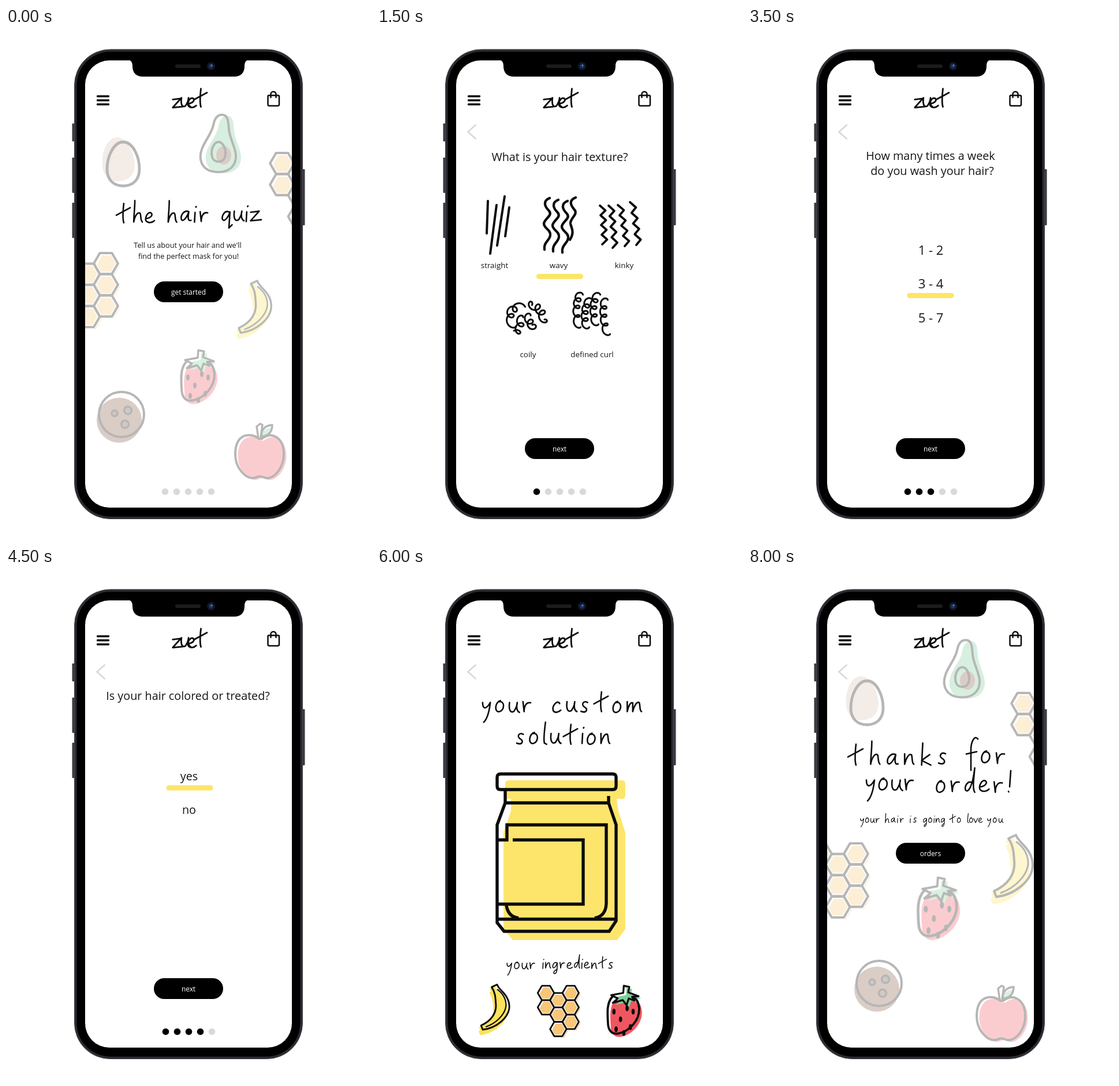
An HTML page that plays this animation: 632 px wide and 885 px high, repeating every 9 s.

```html
<!DOCTYPE html>
<html lang="en">
<head>
<meta charset="utf-8">
<title>Hair quiz</title>
<style>
html,body{margin:0;width:100%;height:100%;overflow:hidden;background:#fff}
svg{display:block;width:100vw;height:100vh}
text{font-family:"Open Sans","Noto Sans",sans-serif;text-anchor:middle;fill:#161616}
.ln{fill:none;stroke:#0c0c0c;stroke-linecap:round;stroke-linejoin:round}
</style>
</head>
<body>
<svg id="stage" viewBox="0 0 632 885" xmlns="http://www.w3.org/2000/svg"></svg>
<script>
const LOOP = 9000;
let css = '', count = 0;

// Show content only from a to b (ms) of the loop.
function during(a, b, content) {
  const id = 'w' + count++;
  const key = (t, v) => `${t / LOOP * 100}%{visibility:${v}}`;
  css += `@keyframes ${id}{${key(0, a ? 'hidden' : 'visible')}${key(a, 'visible')}${key(b, 'hidden')}}`
       + `.${id}{animation:${id} ${LOOP}ms step-end infinite}`;
  return `<g class="${id}">${content}</g>`;
}

const line = (d, w = 4, more = '') => `<path class="ln" d="${d}" stroke-width="${w}" ${more}/>`;
const shape = (d, fill, more = '') => `<path d="${d}" fill="${fill}" ${more}/>`;
const move = (x, y, s = 1) => `transform="translate(${x} ${y}) scale(${s})"`;
const text = (s, x, y, size = 19.8, fill = '#161616') =>
  `<text x="${x}" y="${y}" font-size="${size}" style="fill:${fill}">${s}</text>`;
const label = (s, x, y) => text(s, x, y, 13.4);
const use = (id, x = 0, y = 0, s = 1) => `<use href="#${id}" ${move(x, y, s)}/>`;
const pill = (s, y) => `<rect x="256" y="${y}" width="120" height="36" rx="18"/>` + text(s, 316, y + 22.5, 11.9, '#fff');
const mark = (x, y) => `<rect x="${x}" y="${y}" width="81" height="9" rx="4.5" fill="#fde567"/>`;
const dots = (n, x = 276.5) => [0, 1, 2, 3, 4].map(i =>
  `<circle cx="${x + i * 20}" cy="801.5" r="5.8" fill="${i < n ? '#000' : '#d9d9d9'}"/>`).join('');

// Handwriting: pen strokes on a 10 unit x-height, baseline at 0.
const pen = {
  a: 'M8-9C4-11 0-6 1-2C2 1 6-3 8-9C7-4 7 0 10-1',
  c: 'M7-8C5-12 0-6 1-2C2 1 6 0 8-2',
  d: 'M7-8C3-11 0-5 1-2C3 1 7-4 9-21C8-10 7-3 9 0',
  e: 'M1-4C5-4 8-7 6-9C3-11 0-5 1-2C3 1 7 0 9-2',
  f: 'M10-21C7-25 4-18 4-12L4 6M0-8L9-10',
  g: 'M7-9C3-11 0-5 1-2C3 1 7-5 8-9C8-2 8 8 4 8C1 8 2 4 8 1',
  h: 'M2-20C2-12 1-6 1 0C2-6 5-10 7-8C8-6 7-2 9 0',
  i: 'M1.5-9L1 0M2.3-14L2.6-14.5',
  k: 'M2-19L1 0M8-9L1-4L9 0',
  l: 'M3-20C2-12 1-5 2-1L4 0',
  m: 'M1-9L1 0C2-5 4-9 6-8L6 0C7-5 10-10 12-8C13-5 12-1 14 0',
  n: 'M1-9L1 0C2-5 5-10 7-8C8-5 7-1 9 0',
  o: 'M5-10C0-9-1 1 4 0C9-1 9-10 4-9',
  q: 'M7-9C3-11 0-5 1-2C3 1 7-5 8-9L7 6L10 3',
  r: 'M1-9L2 0C2-5 4-9 8-8',
  s: 'M7-9C3-11 1-7 4-5C8-3 6 1 1-1',
  t: 'M7-18C6-9 6-3 7 0M0-7L13-14',
  u: 'M1-9C0-2 2 1 5-1C7-4 8-7 8-9C7-4 8-1 10 0',
  v: 'M0-9L4 0L9-10',
  y: 'M1-9C1-3 4-2 8-9C7 0 5 6 2 9',
  z: 'M1-8L9-9L1 0L11-1',
  '!': 'M3-18L2-4M1 0L1.2.4'
};
const wide = { i: 2, l: 4, m: 14, t: 13, z: 11, '!': 3 };

function hand(word, x0, x1, y, s, w = 2.6) {
  const sizes = [...word].map(c => wide[c] || 9);
  const gap = ((x1 - x0) / s - sizes.reduce((a, b) => a + b)) / (word.length - 1);
  let x = 0;
  const strokes = [...word].map((c, i) => {
    const p = line(pen[c], w / s, move(x, i % 2 ? -.4 : .3));
    x += sizes[i] + gap;
    return p;
  }).join('');
  return `<g role="img" aria-label="${word}" ${move(x0, y, s)}>${strokes}</g>`;
}

// Hair strands
function zigzag(x0, y0, x1, y1, n) {
  let d = '';
  for (let i = 0; i <= n; i++) {
    const k = i / n, side = i % 2 ? 5 : -4;
    d += `${i ? 'L' : 'M'}${x0 + (x1 - x0) * k + side} ${y0 + (y1 - y0) * k}`;
  }
  return line(d, 3.8);
}
function curl(x0, y0, cx, cy, x1, y1, turns, r) {
  let d = '';
  for (let i = 0; i <= 80; i++) {
    const k = i / 80, j = 1 - k, a = k * turns * 2 * Math.PI;
    const x = j * j * x0 + 2 * j * k * cx + k * k * x1 + r * Math.cos(a);
    const y = j * j * y0 + 2 * j * k * cy + k * k * y1 - r * Math.sin(a);
    d += `${i ? 'L' : 'M'}${x.toFixed(1)} ${y.toFixed(1)}`;
  }
  return line(d, 3);
}
const strand = 'M299 294C286 299 291 309 297 315C306 324 290 329 289 338C289 347 301 348 300 358C299 368 288 370 290 383';
const waves = [[0, 0], [15, 3], [31, 5]].map(p => line(strand, 4.3, move(...p))).join('')
  + line('M344 293C331 298 336 307 341 313C350 322 334 328 335 338C336 345 343 352 334 366', 4.3);

// Ingredients
const eggD = 'M203 197C219 197 231 221 231 244C231 263 219 273 203 273C187 273 175 263 175 244C175 221 187 197 203 197Z';
const egg = shape(eggD, '#d8c0ae', 'transform="translate(-9 -8) rotate(-5 203 235)"') + line(eggD, 4.8);

const avoD = 'M374 150C365 150 361 157 359 168C356 182 347 191 340 207C331 230 341 248 366 249C386 250 399 238 398 220C397 206 388 192 386 176C385 160 384 150 374 150Z';
const avocado = shape(avoD, '#7aca94', move(9, 2)) + line(avoD)
  + '<ellipse cx="377" cy="220" rx="13" ry="16" fill="#845841"/>'
  + line('M368 197C375 197 380 207 380 216C380 226 375 231 368 231C361 231 356 226 356 216C356 207 361 197 368 197Z');

const hexAt = (x, y) => {
  const p = [];
  for (let i = 0; i < 6; i++) {
    const a = i * Math.PI / 3;
    p.push((x + 14.2 * Math.cos(a)).toFixed(1) + ' ' + (y + 14.2 * Math.sin(a)).toFixed(1));
  }
  return `M${p.join('L')}Z`;
};
const cells = [[0, 0], [0, 25], [21.4, 12.5], [21.4, 37.5], [21.4, 62.5], [42.8, 0], [42.8, 25], [42.8, 50]];
const combD = cells.map(c => hexAt(...c)).join('');
const comb = shape(combD, '#f8c676', move(2.7, 2.7)) + line(combD, 5, 'style="stroke:#fff"') + line(combD, 2.8);

const banD = 'M433 438L446 432C449 445 475 455 475 485C474 510 445 535 412 539L408 529C432 518 445 500 443 478C442 460 441 450 433 438Z';
const banana = shape(banD, '#fbe25a', move(-6, 13)) + shape(banD, '#fbe25a', move(-5, 4))
  + line(banD) + line('M447 444C460 454 468 466 467 483C464 505 442 524 420 532', 3);

const berryD = 'M312 577C302 588 303 605 304 622C304 640 312 645 322 644C345 640 362 618 361 598C360 588 357 581 351 579';
const leafD = 'M332 570L310 574L322 580L313 588L331 583L338 592L342 580L352 584L348 577L360 576L341 569L343 559L333 557Z';
const berry = shape(berryD, '#f0565f', move(5, 6)) + shape(leafD, '#7fcf98', move(5, 4))
  + line(berryD) + line(leafD, 3.4)
  + [[315, 604], [339, 598], [350, 604], [327, 618], [319, 636], [345, 632], [333, 643]]
    .map(([x, y]) => `<ellipse cx="${x}" cy="${y}" rx="3" ry="5.2" fill="#0c0c0c"/>`).join('');

const ring = (x, y, r, w, fill = 'none') =>
  `<circle cx="${x}" cy="${y}" r="${r}" fill="${fill}" stroke="#0c0c0c" stroke-width="${w}"/>`;
const coconut = '<circle cx="196" cy="678" r="39" fill="#845841"/>' + ring(200, 668, 39, 4)
  + ring(188, 666, 5, 3.4, '#66483a') + ring(211, 661, 6.5, 3.4, '#66483a') + ring(206, 685, 6.5, 3.4, '#66483a');

const appD = 'M438 710C425 699 397 699 397 737C397 760 414 778 427 778C433 778 435 775 440 775C445 775 447 779 454 778C468 776 481 757 481 737C481 705 457 697 443 710Z';
const appLeaf = 'M442 706C442 692 450 687 461 686C461 698 455 705 442 706Z';
const apple = shape(appD, '#f0565f', move(4.5, 3)) + shape(appLeaf, '#7fcf98', move(-1, 5))
  + line(appD) + line(appLeaf, 3.4) + line('M437 709L434 689L440 684L444 686L441 707', 3.4);

const defs = Object.entries({ waves, egg, avocado, comb, banana, berry, coconut, apple })
  .map(([id, g]) => `<g id="${id}">${g}</g>`).join('');

const faded = g => `<g opacity=".3">${g}</g>`;

const intro = faded(use('egg') + use('avocado') + use('comb', 478, 234, 1.47) + use('comb', 110, 407, 1.47)
    + use('banana', 60.3, 74.1, .84) + use('berry') + use('coconut') + use('apple'))
  + hand('the', 191, 257, 336, 1.85) + hand('hair', 279, 351, 335, 1.85) + hand('quiz', 373, 442, 334, 1.85)
  + text("Tell us about your hair and we'll", 314.5, 380, 12.65) + text('find the perfect mask for you!', 316, 399, 12.65)
  + pill('get started', 438) + dots(0, 275.5);

const texture = text('What is your hair texture?', 316.5, 230)
  + line('M192 299L190 355M207 306L196 390M221 291L208 376M229 310L222 360', 4)
  + use('waves')
  + zigzag(390, 307, 394, 374, 8) + zigzag(405, 307, 412, 380, 8) + zigzag(421, 306, 433, 377, 8) + zigzag(442, 301, 453, 375, 8)
  + curl(250, 482, 222, 482, 234, 516, 3, 6.5) + curl(247, 500, 252, 515, 239, 529, 2.3, 6)
  + curl(262, 479, 288, 480, 288, 510, 3.2, 6.5) + curl(260, 497, 264, 510, 271, 519, 2.3, 6)
  + curl(351, 461, 342, 475, 347, 517, 4, 5.5) + curl(367, 470, 355, 490, 362, 517, 4, 5.5)
  + curl(381, 461, 370, 480, 378, 512, 4, 5.5) + curl(394, 470, 388, 495, 398, 529, 4, 5.5)
  + label('straight', 203.5, 415) + label('wavy', 314.5, 415) + label('kinky', 428, 415)
  + label('coily', 261.5, 568.5) + label('defined curl', 372.5, 568.5);

const blobD = 'M200 289C225 287 247 315 247 340C247 360 225 366 208 365C185 363 160 350 160 326C160 305 178 291 200 289Z';
const color = text('What is the closest', 313.5, 228) + text('to your hair color?', 316, 254)
  + [['#7d6555', 0, 0, 0, 0, 'dark brown', 208, 415],
     ['#2b2b2b', 115.5, 0, 116, 0, 'black', 317, 415],
     ['#fde362', 230, -3, 230, -4, 'blonde', 431, 415],
     ['#bf9f7f', 61.5, 173, 57, 174, 'light brown', 261.5, 575],
     ['#e8906c', 173, 173, 169, 174, 'red', 372, 575]]
    .map(([c, bx, by, sx, sy, s, x, y]) =>
      shape(blobD, c, move(bx, by)) + use('waves', sx - 120, sy - 9) + label(s, x, y)).join('');

const wash = text('How many times a week', 316, 228) + text('do you wash your hair?', 319, 254)
  + text('1 - 2', 316.5, 392, 22) + text('3 - 4', 316.5, 450, 22) + text('5 - 7', 316.5, 509, 22);

const treated = text('Is your hair colored or treated?', 315, 228)
  + text('yes', 317, 367) + text('no', 317, 425);

const moment = faded(use('egg', -1) + use('avocado', -1, -10.5) + use('comb', 477, 234, 1.47) + use('comb', 124, 410.5, 1.47)
    + use('banana') + use('berry', -18, -65) + use('coconut', 0, -32) + use('apple', -1))
  + text('Just one moment while', 319, 328) + text('we get your custom', 321.5, 354) + text('solution ready!', 318.5, 380)
  + pill('finish', 709) + dots(5);

const jar = shape('M228 367H424Q430 367 430 373V393Q430 399 424 399H415L418 420L430 457V624L416 643H235L219 624V457L232 420V399H228Q222 399 222 393V373Q222 367 228 367Z', '#fde56c')
  + line('M214 356H408Q414 356 414 362V377Q414 383 408 383H214Q208 383 208 377V362Q208 356 214 356Z'
    + 'M222 385V406H401V394M222 406L208 444V613L220 628H402L414 610V444L401 406M208 607H414'
    + 'M208 470H225V444H397V580Q396 602 377 605M235 470H357V581H208M224 583Q227 603 245 605', 5.4,
    'style="stroke-linecap:butt;stroke-linejoin:miter"');

const result = hand('your', 181, 268, 249, 1.9) + hand('custom', 303, 458, 249, 1.9) + hand('solution', 240, 403, 304, 1.9)
  + jar + hand('your', 224, 274, 693, 1.15, 1.6) + hand('ingredients', 286, 410, 692, 1.1, 1.6)
  + use('banana', -117.6, 404.6, .73) + use('comb', 292.5, 734.5) + use('berry', 111, 193, .95);

const note = [['your', 194, 228], ['hair', 237, 270], ['is', 280, 293], ['going', 303, 341],
  ['to', 349, 369], ['love', 379, 406], ['you', 414, 441]];
const thanks = faded(use('egg', 3, -2) + use('avocado', 3, -25.5) + use('comb', 477, 234, 1.47) + use('comb', 124, 494, 1.47)
    + use('banana', 18, 29.5) + use('berry', -57.5, -111, 1.16) + use('coconut', 27, 50) + use('apple', -1, 38))
  + hand('thanks', 173, 346, 340, 2) + hand('for', 378, 446, 337, 2)
  + hand('your', 203, 288, 384, 2) + hand('order!', 325, 455, 387, 2)
  + note.map(([s, a, b]) => hand(s, a, b, 440, .8, 1.2)).join('') + pill('orders', 475);

// Phone
const side = (x, y, h) => `<rect x="${x}" y="${y}" width="4" height="${h}" rx="1.2" fill="#3a3a42"/>`;
const phone = side(114.5, 165, 31) + side(114.5, 224, 61) + side(114.5, 302, 61) + side(513.5, 244, 97)
  + '<rect x="118.5" y="37" width="395" height="811.5" rx="62" fill="#2b2b31" stroke="#45454d"/>'
  + '<rect x="122.5" y="41" width="387" height="803.5" rx="58"/>'
  + '<rect x="137" y="56" width="358" height="773" rx="42" fill="#fff"/>';
const notch = shape('M208 55C216 55 219 58 219 66C219 77 225 84 237 84H395C407 84 413 77 413 66C413 58 416 55 424 55Z', '#000')
  + '<rect x="293" y="63" width="44" height="6" rx="3" fill="#1c1c1e"/>'
  + '<circle cx="355" cy="66" r="7" fill="#10182a"/><circle cx="355" cy="66" r="3.6" fill="#1d3766"/><circle cx="356" cy="64.5" r="1.2" fill="#6f92cf"/>';
const header = line('M158.5 118H177.5M158.5 125H177.5M158.5 132H177.5', 3.5)
  + hand('zuet', 287, 348, 137, 1.75, 2.8)
  + line('M455 116.5H471Q473 116.5 473 118.5V132Q473 134.5 470.5 134.5H456Q453.5 134.5 453.5 132V118.5Q453.5 116.5 455 116.5ZM458.5 120V114.5A4.5 4.5 0 0 1 467.5 114.5V120', 2.5);
const back = x => line(`M${x + 14} 167L${x} 179.5L${x + 14} 192`, 2.6, 'style="stroke:#d8d8d8;stroke-linecap:butt;stroke-linejoin:miter"');

const screen = during(0, 1000, intro)
  + during(1000, 1500, back(158.5)) + during(1500, 3000, back(157.5))
  + during(3000, 3500, back(158.5)) + during(3500, 9000, back(157.5))
  + during(1000, 2000, texture + dots(1)) + during(1500, 2000, mark(276, 425))
  + during(2000, 3000, color + dots(2)) + during(2500, 3000, mark(275.5, 425))
  + during(3000, 4000, wash + dots(3)) + during(3500, 4000, mark(275.5, 458))
  + during(4000, 5000, treated + dots(4)) + during(4500, 5000, mark(277.5, 375.5))
  + during(1000, 5000, pill('next', 709))
  + during(5000, 6000, moment) + during(6000, 7000, result) + during(8000, 9000, thanks);

document.getElementById('stage').innerHTML =
  `<style>${css}</style><defs>${defs}<clipPath id="glass"><rect x="137" y="56" width="358" height="773" rx="42"/></clipPath></defs>`
  + phone + `<g clip-path="url(#glass)">${screen}</g>` + header + notch;
</script>
</body>
</html>
```
